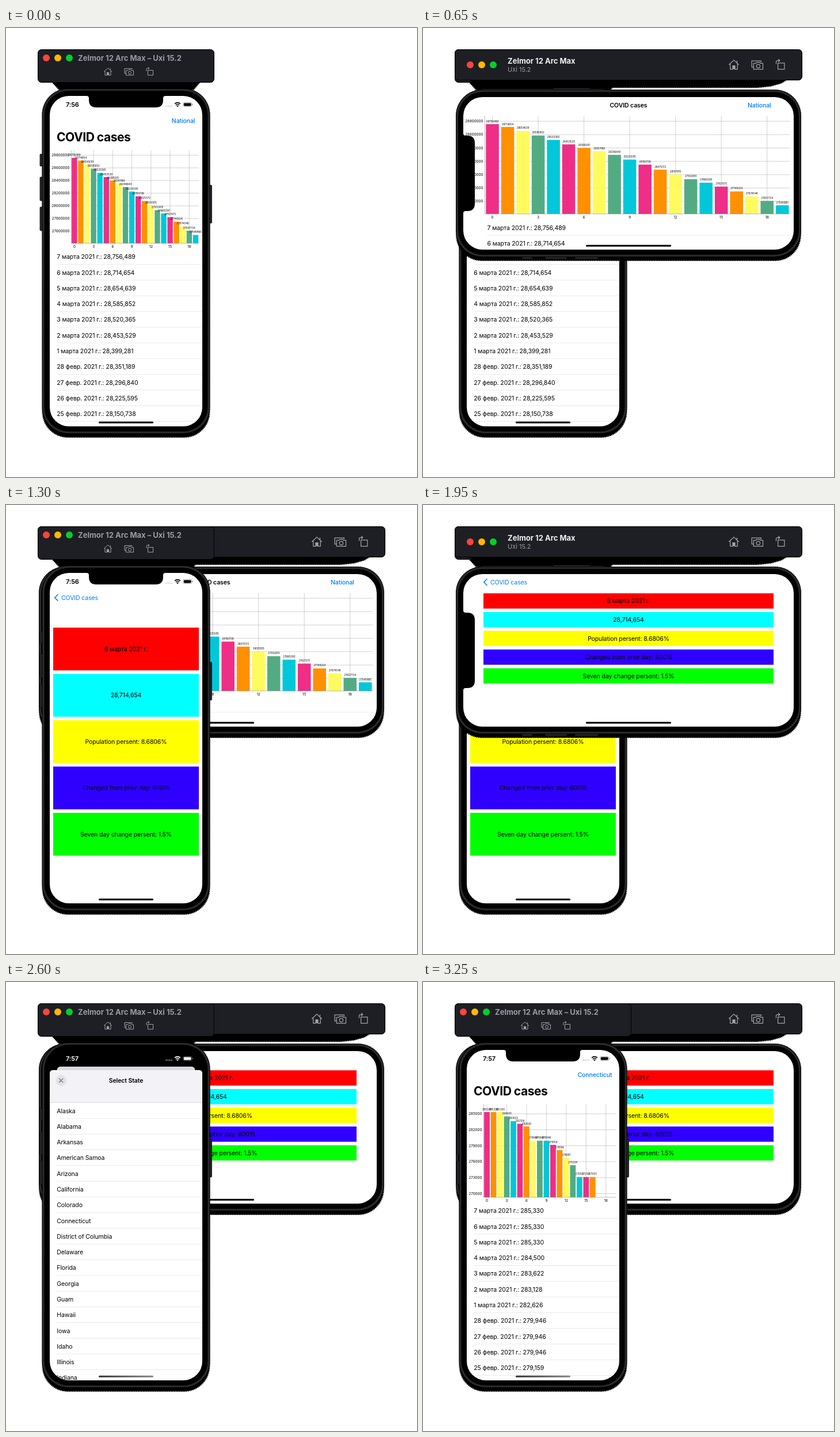
Animation, 714 px wide and 780 px high, one loop 3900 ms. Source, as an HTML page:

```html
<!DOCTYPE html>
<html lang="en">
<head>
<meta charset="utf-8">
<title>Case tracker on two simulators</title>
<style>
  html, body { margin: 0; width: 100%; height: 100%; overflow: hidden; background: #fff; }
  svg { display: block; }
  text { font-family: Inter, Roboto, sans-serif; white-space: pre; }
</style>
</head>
<body>
<svg id="stage" width="714" height="780" viewBox="0 0 714 780">
  <defs>
    <clipPath id="tall"><rect x="76" y="118" width="265" height="574" rx="33"/></clipPath>
    <clipPath id="wide"><rect x="70" y="120" width="574" height="265" rx="33"/></clipPath>
    <linearGradient id="fade"><stop stop-color="#333"/><stop offset="1" stop-color="#888"/></linearGradient>
  </defs>
</svg>
<script>
const STEP = 650, STEPS = 6, BODY = 10.54;
const BLUE = '#007aff';
const DEVICE = 'Zelmor 12 Arc Max', SYSTEM = 'Uxi 15.2';
const BAR_FILLS = ['#ee2e87', '#ff9000', '#fffb5e', '#53ab84', '#00c7d9'];
const BOX_FILLS = ['#f00', '#0ff', '#ff0', '#3000ff', '#0f0'];
const FACTS = ['6 марта 2021 г.', '28,714,654', 'Population persent: 8.6806%',
  'Changed from prior day: 60015', 'Seven day change persent: 1.5%'];
const STATES = ['Alaska', 'Alabama', 'Arkansas', 'American Samoa', 'Arizona', 'California',
  'Colorado', 'Connecticut', 'District of Columbia', 'Delaware', 'Florida', 'Georgia',
  'Guam', 'Hawaii', 'Iowa', 'Idaho', 'Illinois', 'Indiana'];
const NATIONAL = [28756489, 28714654, 28654639, 28585852, 28520365, 28453529, 28399281,
  28351189, 28296840, 28225595, 28150738, 28075172, 28001915, 27932810, 27880280,
  27821575, 27749224, 27674546, 27607724, 27540885];
const LOCAL = [285330, 285330, 285330, 284500, 283622, 283128, 282626, 279946, 279946,
  279946, 279159, 278184, 276691, 275334, 273101, 273101, 273101];

const times = (n, fn) => Array.from({ length: n }, (_, i) => fn(i)).join('');
const rect = (x, y, w, h, fill, r = 0, extra = '') =>
  `<rect x="${x}" y="${y}" width="${w}" height="${h}" rx="${r}" fill="${fill}" ${extra}/>`;
const dot = (x, y, r, fill) => `<circle cx="${x}" cy="${y}" r="${r}" fill="${fill}"/>`;
const path = (d, stroke, width = 1, extra = '') =>
  `<path d="${d}" fill="none" stroke="${stroke}" stroke-width="${width}" ${extra}/>`;

// y is the middle of the capitals
function text(str, x, y, { size = BODY, weight = 400, fill = '#000', anchor = 'start', track = -0.011 } = {}) {
  return `<text x="${x}" y="${y + size * 0.364}" font-size="${size}" font-weight="${weight}" fill="${fill}"
    text-anchor="${anchor}" letter-spacing="${track}em">${str}</text>`;
}

function icons(spots, scale) {
  const home = 'M-7 0L0-6.5L7 0M-5-1.5V6H-1.6V1.2H1.6V6H5V-1.5M4.4-5.8V-3';
  const camera = 'M-5 3H-7.5V-5.5H5.5V-3.6M-5-2.2H-1.6L-.4-3.6H3.4L4.6-2.2H8V6H-5Z' +
    'M4 1.8A2.5 2.5 0 1 1-1 1.8A2.5 2.5 0 1 1 4 1.8';
  const rotate = 'M-3.5-2.5H5.5V6H-3.5ZM-6-1V-4.5Q-6-6-4-6H-1M-3-8L-1-6L-3-4';
  return [home, camera, rotate].map((d, i) =>
    `<g transform="translate(${spots[i]}) scale(${scale})">${path(d, '#a2a2a7')}` +
    (i ? '' : rect(-1.6, 1.2, 3.2, 4.8, '#a2a2a7')) + '</g>').join('');
}

const lights = (x, y) => ['#ff433e', '#ffb800', '#04cf2c'].map((c, i) => dot(x + 20 * i, y, 6, c)).join('');
const titleBar = (w, h) => rect(55.5, 37.5, w, h, '#1e1f24', 6, 'stroke="#000"');

function shell(x, y, w, h) {
  return rect(x, y, w, h, '#000', 46) +
    rect(x + 1, y + 1, w - 2, h - 2, '#2b2c2f', 45) +
    rect(x + 3.5, y + 3.5, w - 7, h - 7, '#141415', 43) +
    rect(x + 4.5, y + 4.5, w - 9, h - 9, '#000', 42);
}

const shadow = (x, y, w, h) =>
  rect(x + 1, y + 1, w - 2, h + 5, '#000', 44, 'stroke="#000" stroke-width="2" stroke-dasharray="1.5 1.5"');
const cast = d => `<path d="${d}" stroke="#000" stroke-width="2" stroke-dasharray="1.5 1.5"/>`;
const button = (x, y, w, h) => rect(x, y, w, h, '#252628', 1.2, 'stroke="#0a0a0a" stroke-width=".8"');

function tallPhone(content, { time, ink = '#000', paper = '#fff', indicator = '#000' }) {
  const status = text(time, 104, 133, { size: 11, weight: 600, fill: ink }) +
    times(4, i => dot(278.3 + 3.2 * i, 135.8, 1, '#bbb')) +
    path('M293 131.6Q298 127.6 303 131.6M294.9 133.8Q298 131.2 301.1 133.8', ink, 1.6) +
    `<path d="M296.2 135.2Q298 133.8 299.8 135.2L298 137.2Z" fill="${ink}"/>` +
    rect(307.6, 129.4, 15.2, 7.2, 'none', 2.2, `stroke="${ink}" stroke-opacity=".4" stroke-width=".7"`) +
    rect(308.8, 130.6, 12.8, 4.8, ink, 1.3) + rect(323.6, 131.8, 1, 2.4, ink, 0.5, 'opacity=".5"');
  return cast('M80 94H337L326 107H92Z') + titleBar(306, 57) + lights(70, 52) +
    text(`${DEVICE} – ${SYSTEM}`, 125, 52, { size: 13, weight: 700, fill: '#9b9ba0', track: 0 }) +
    icons(['177 76', '213.5 76', '250 76'], 1) +
    shadow(62.5, 105, 292, 600) +
    button(59, 219, 6, 21) + button(59, 259, 6, 41) + button(59, 311, 6, 41) + button(352, 273, 5.5, 66) +
    shell(62.5, 105, 292, 600) +
    `<g clip-path="url(#tall)">${rect(76, 118, 265, 574, paper)}${content}
    <path d="M140 118q4 0 4 4v3q0 13 13 13h103q13 0 13-13v-3q0-4 4-4z"/>${status}
    ${rect(161, 683.8, 95, 3, indicator, 1.5)}</g>`;
}

function widePhone(content) {
  return cast('M80 90H632L622 96L604 101L580 103.5H100Z') + titleBar(603, 53) + lights(82, 64) +
    text(DEVICE, 147, 57.5, { size: 13, weight: 700, fill: '#f2f2f3', track: 0 }) +
    text(SYSTEM, 147, 72, { size: 11, fill: '#9b9ba0', track: 0 }) +
    icons(['540 64', '580.5 64', '621 64'], 1.25) +
    shadow(57, 107, 600, 291) +
    button(226, 104.5, 64, 5) + button(172, 395, 18, 6) + button(212, 395, 38, 6) + button(264, 395, 40, 6) +
    shell(57, 107, 600, 291) +
    `<g clip-path="url(#wide)">${rect(70, 120, 574, 265, '#fff')}${content}
    <path d="M70 183q0 4 4 4h3q13 0 13 13v105q0 13-13 13h-3q-4 0-4 4z"/>
    ${rect(283, 376.8, 148, 3, '#000', 1.5)}</g>`;
}

function chart(data, { left, right, top, bottom, first, tick, count, gap, y0 }) {
  const pitch = (right - left) / 20;
  const mid = i => left + pitch * (i + 0.5);
  const yOf = v => y0 + (first - v) / tick * gap;
  const small = { size: 6.2, track: 0 };
  const rows = times(count, i => path(`M${left} ${y0 + gap * i}H${right}`, '#b4b4b4', 0.6));
  const cols = times(7, i => path(`M${mid(3 * i)} ${top}V${bottom}`, '#b4b4b4', 0.6));
  const bars = data.map((v, i) =>
    rect(mid(i) - pitch * 0.425, yOf(v), pitch * 0.85, bottom - yOf(v), BAR_FILLS[i % 5])).join('');
  const values = data.map((v, i) =>
    text(v, mid(i), yOf(v) - 5, { size: 4.4, anchor: 'middle', track: 0 })).join('');
  return rows + cols + bars + path(`M${left} ${top}V${bottom}H${right}`, '#8a8a8a', 0.6) + values +
    times(count, i => text(first - tick * i, left - 3, y0 + gap * i, { ...small, anchor: 'end' })) +
    times(7, i => text(3 * i, mid(3 * i), bottom + 6, { ...small, anchor: 'middle' }));
}

function list(items, x, y, right) {
  return items.map((s, i) => text(s, x, y + 27.28 * i) +
    path(`M${x} ${y + 13.2 + 27.28 * i}H${right}`, '#dcdcde', 0.6)).join('');
}

const dayRows = (data, n) => data.slice(0, n).map((v, i) =>
  `${i < 7 ? 7 - i + ' марта' : 35 - i + ' февр.'} 2021 г.: ${v.toLocaleString('en-US')}`);

const back = (x, y) =>
  path(`M${x + 6} ${y - 5.3}l-5.3 5.3l5.3 5.3`, BLUE, 1.6, 'stroke-linecap="round" stroke-linejoin="round"') +
  text('COVID cases', x + 12, y, { fill: BLUE });

const boxes = (x, y, w, h, pitch) => FACTS.map((s, i) =>
  rect(x, y + pitch * i, w, h, BOX_FILLS[i]) +
  text(s, x + w / 2, y + pitch * i + h / 2, { anchor: 'middle' })).join('');

const home = (region, data, axes) =>
  text(region, 328.4, 161, { weight: 500, fill: BLUE, anchor: 'end' }) +
  text('COVID cases', 88, 189.5, { size: 21.1, weight: 700, track: -0.024 }) +
  chart(data, { right: 335, top: 212.5, bottom: 374, ...axes }) +
  list(dayRows(data, 11), 88.3, 397.5, 341);

const nationalAxis = { first: 28800000, tick: 200000, count: 7 };

const homeWide =
  text('COVID cases', 357, 134, { weight: 600, anchor: 'middle' }) +
  text('National', 564, 134, { weight: 500, fill: BLUE }) +
  chart(NATIONAL, { left: 107.3, right: 637.5, top: 153, bottom: 323, gap: 23.2, y0: 162, ...nationalAxis }) +
  list(dayRows(NATIONAL, 2), 111.5, 346.8, 638);

const picker =
  rect(88.5, 147, 240, 30, '#dadadc', 6) + rect(76, 153, 265, 560, '#fff', 6) +
  `<path d="M76 209.5V159q0-6 6-6H335q6 0 6 6V209.5z" fill="#f2f2f7"/>` +
  path('M76 209.5H341', '#d0d0d4', 0.7) +
  dot(95.7, 171, 9.4, '#e2e2e7') +
  path('M92.5 167.8l6.4 6.4m0-6.4l-6.4 6.4', '#7b7b80', 1.4, 'stroke-linecap="round"') +
  text('Select State', 208.5, 171, { weight: 600, anchor: 'middle' }) +
  list(STATES, 88.3, 223.8, 341);

// each window with the steps during which it is on stage, bottom to top
const windows = [
  [0, 1, tallPhone(home('National', NATIONAL, { left: 113.3, gap: 22, y0: 221, ...nationalAxis }), { time: '7:56' })],
  [1, 2, widePhone(homeWide)],
  [2, 3, tallPhone(back(84, 161) + boxes(82, 213, 253, 74.3, 80.45), { time: '7:56' })],
  [3, 5, widePhone(back(105, 134) + boxes(105, 153.4, 504, 26.5, 32.55))],
  [4, 4, tallPhone(picker, { time: '7:57', ink: '#fff', paper: '#000', indicator: 'url(#fade)' })],
  [5, 5, tallPhone(home('Connecticut', LOCAL,
    { left: 105.3, gap: 27.7, y0: 229, first: 285000, tick: 3000, count: 6 }), { time: '7:57', indicator: 'url(#fade)' })],
];

const stage = document.getElementById('stage');
for (const [from, to, markup] of windows) {
  const g = document.createElementNS('http://www.w3.org/2000/svg', 'g');
  g.innerHTML = markup;
  stage.append(g);
  const keys = Array.from({ length: STEPS + 1 }, (_, i) => {
    const s = Math.min(i, STEPS - 1);
    return { offset: i / STEPS, visibility: s >= from && s <= to ? 'visible' : 'hidden', easing: 'step-end' };
  });
  g.animate(keys, { duration: STEP * STEPS, iterations: Infinity });
}
</script>
</body>
</html>
```
